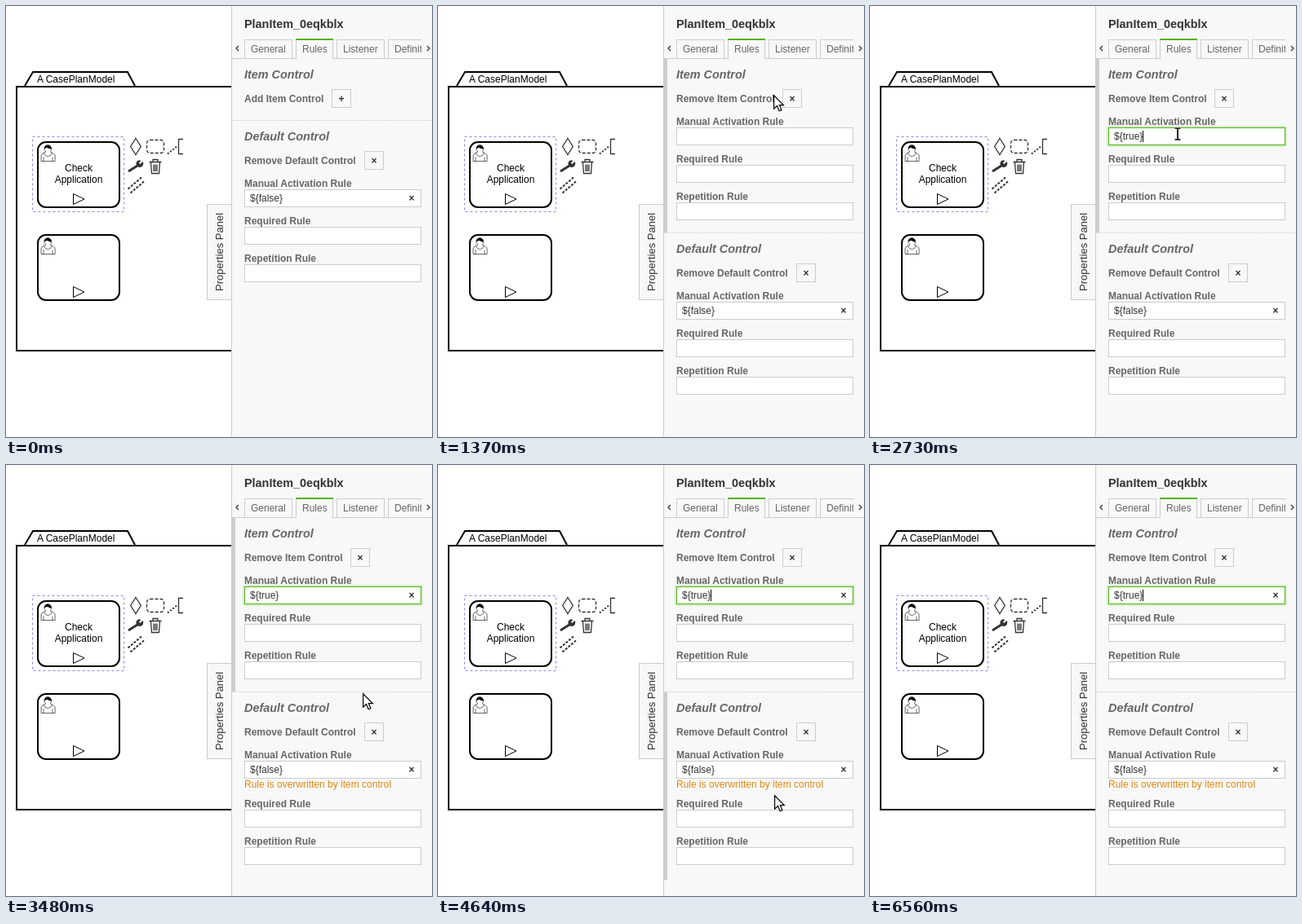
These frames come from a looping animation (522x529 px, 6.74 s). An HTML page:

```html
<!DOCTYPE html>
<html>
<head>
<meta charset="utf-8">
<style>
html, body { margin: 0; width: 100%; height: 100%; overflow: hidden; background: #fff; }
svg { display: block; }
text { font: 12px "Liberation Sans", Arial, sans-serif; fill: #000; white-space: pre; }
.tab { fill: #666; }
.label { font-weight: bold; fill: #666; }
.head { font: italic bold 14.4px "Liberation Sans", Arial, sans-serif; fill: #666; }
.title { font: bold 14.4px "Liberation Sans", Arial, sans-serif; fill: #333; }
.value { fill: #333; }
.sign { font-weight: bold; fill: #333; text-anchor: middle; }
.warn { fill: #e08a14; }
.box { fill: #f8f8f8; stroke: #ccc; }
.input { fill: #fff; stroke: #ccc; }
.line { fill: none; stroke: #000; }
.icon { fill: none; stroke: #333; stroke-width: 1.3; }
</style>
</head>
<body>
<svg id="stage" width="522" height="529" viewBox="0 0 522 529">
  <defs>
    <g id="task">
      <rect class="line" width="100" height="80" rx="10" stroke-width="2"/>
      <path class="line" d="M43.5 63.5v13l13.5-6.5z"/>
      <g stroke="#000" stroke-width=".6" fill="#fff">
        <path d="M15 12c.9-.8 1.6-2 1.6-3.4c0-2.6-1.8-4.6-4.4-4.6S8 6.100 8 8.600c0 1.400 1 2.600 1.900 3.400c-.5.2-5.700 2.100-5.800 4.800v6.700h17v-6.700c0-2.300-5.500-4.600-6.100-4.800zM7 18v5.500M18 23.500v-5"/>
        <path d="M17.200 13c0 2.400-2.200 4.400-4.900 4.400s-4.800-2-4.800-4.400"/>
        <path fill="#000" d="M8.100 8.200s2.300-2.400 4.300-1.200s4.200 1.500 4.100 1c-.1-.6-.1-3.800-4.200-4.200c-3.600 0-4.200 3.400-4.200 4.400z"/>
      </g>
    </g>
  </defs>

  <path class="line" stroke-width="2" d="M280 99H13V423H280M23 98L33 81H149L158 98"/>
  <text x="38" y="94">A CasePlanModel</text>
  <use href="#task" x="39" y="167"/>
  <use href="#task" x="39" y="281"/>
  <g text-anchor="middle">
    <text x="89" y="203">Check</text>
    <text x="89" y="217">Application</text>
  </g>
  <rect x="32.500" y="160.500" width="112" height="92" fill="none" stroke="#88f" stroke-dasharray="3 3"/>

  <g class="icon">
    <path d="M159 162.500L165.300 172.500L159 182.500L152.700 172.500z"/>
    <rect x="172.500" y="164.500" width="21" height="16" rx="4" stroke-dasharray="4 2"/>
    <path d="M217 163.500H211.500V181.500H217"/>
    <path d="M198 181.500L210 172" stroke-width="2" stroke-dasharray="2 2"/>
    <path d="M150 203L161 196" stroke-width="3"/>
    <path d="M167.500 191.500L164.500 194.500L162.500 192.500L164.500 190C160.500 189 158.500 193 161 196.500C164 199 169 197 167.500 191.500z" fill="#333" stroke-width="1"/>
    <path d="M175.500 191.500H190.500M180 191V188.500H186V191M177.500 192L178.500 205.500H187.500L188.500 192M181 194.500V203M183 194.500V203M185 194.500V203"/>
    <path d="M149.500 224.500L166 210.500M152.500 229.500L169 215.500" stroke-width="2" stroke-dasharray="3 1.700"/>
  </g>

  <rect x="277" width="245" height="529" fill="#f8f8f8"/>
  <rect class="box" x="246.500" y="243.500" width="30" height="117"/>
  <path d="M276.500 0V529" stroke="#ccc"/>
  <text class="value" transform="translate(266 350) rotate(-90)" style="font-size:13px">Properties Panel</text>

  <text class="title" x="292" y="27">PlanItem_0eqkblx</text>
  <path d="M277 64.500H522" stroke="#ccc"/>
  <rect class="box" x="292.500" y="41.500" width="58" height="23"/>
  <rect class="box" x="405.500" y="41.500" width="58" height="23"/>
  <rect x="355" y="40" width="46" height="25" fill="#f8f8f8"/>
  <path class="line" style="stroke:#ccc" d="M355.500 40V65M400.500 40V65"/>
  <rect x="355" y="40" width="46" height="2" fill="#52b415"/>
  <text class="tab" x="300" y="57">General</text>
  <text class="tab" x="363" y="57">Rules</text>
  <text class="tab" x="413" y="57">Listener</text>
  <svg x="468" y="41" width="41" height="24">
    <rect class="box" x=".5" y=".5" width="70" height="23"/>
    <text class="tab" x="8" y="16">Definition</text>
  </svg>
  <path class="icon" d="M285 49L282 52L285 55M516 49L519 52L516 55"/>

  <rect id="bar" x="277" width="4" fill="#ccc"/>
  <g id="panel"></g>
  <path id="caret" d="M0 153V167" stroke="#000"/>
  <g id="arrow">
    <path d="M.6 .8V17.200L4.500 13.600L7.100 19.800L9.900 18.600L7.300 12.600H12.300z" fill="#fff" stroke="#000" stroke-width="1.200"/>
  </g>
  <g id="beam" fill="none">
    <path d="M-3.500-7H-1Q0-7 0-6V6Q0 7-1 7H-3.500M3.500-7H1Q0-7 0-6V6Q0 7 1 7H3.500" stroke="#fff" stroke-width="3.500"/>
    <path d="M-3.500-7H-1Q0-7 0-6V6Q0 7-1 7H-3.500M3.500-7H1Q0-7 0-6V6Q0 7 1 7H3.500" stroke="#000" stroke-width="1.700"/>
  </g>
</svg>
<script>
const $ = id => document.getElementById(id);
const text = (cls, x, y, s) => `<text class="${cls}" x="${x}" y="${y}">${s}</text>`;
const button = (x, y, s) =>
  `<rect class="box" x="${x + .5}" y="${y + .5}" width="23" height="22"/>` + text('sign', x + 12, y + 16, s);

// y is the middle of the label
function field(name, y, value = '', clear = value, focus = false) {
  const box = (extra, grow) =>
    `<rect x="${292.5 - grow}" y="${y + 7.5 - grow}" width="${216 + 2 * grow}" height="${21 + 2 * grow}" ${extra}/>`;
  return text('label', 292, y + 4, name + ' Rule') +
    (focus ? box('rx="2" fill="none" stroke="#52b415" stroke-opacity=".2" stroke-width="3"', 1) : '') +
    box(`class="input" ${focus ? 'style="stroke:#52b415"' : ''}`, 0) +
    (value ? text('value', 299, y + 22, value) : '') +
    (clear ? text('sign', 497, y + 22, '×') : '');
}

function panel(open, focus, typed, checked) {
  const y = open ? 278 : 140;
  const gap = checked ? 14 : 0;
  let s = text('head', 292, 89, 'Item Control');
  s += text('label', 292, 118, (open ? 'Remove' : 'Add') + ' Item Control');
  s += open ? button(422, 102, '×') : button(399, 102, '+');
  if (open) {
    s += field('Manual Activation', 142, typed ? '${true}' : '', checked, focus) +
      field('Required', 188) + field('Repetition', 234);
  }
  s += `<path d="M277 ${y + .5}H522" stroke="#ccc" stroke-dasharray="1 1"/>`;
  s += text('head', 292, y + 25, 'Default Control');
  s += text('label', 292, y + 54, 'Remove Default Control') + button(439, y + 38, '×');
  s += field('Manual Activation', y + 78, '${false}');
  if (checked) s += text('warn', 292, y + 118, 'Rule is overwritten by item control');
  return s + field('Required', y + 124 + gap) + field('Repetition', y + 170 + gap);
}

const LOOP = 6740;
const blinks = [2090, 2580, 2730, 3210, 3700, 4170, 4640, 5120, 5600, 6110, 6560];
// time, x, y of the pointer
const path = [
  [720, 515, 171], [1080, 407, 112], [1200, 411, 109], [1370, 411, 109], [1970, 377, 157],
  [2980, 377, 157], [3480, 437, 280], [3680, 455, 340], [3880, 472, 400], [4000, 468, 411],
  [4320, 443, 405], [4640, 412, 405], [5040, 428, 405], [5100, 428, 405], [5360, 437, 403],
  [6070, 437, 403], [6400, 526, 385]
];

function pointer(t) {
  const i = path.findIndex(p => p[0] > t);
  if (i < 1) return null;
  const [a, b] = [path[i - 1], path[i]];
  const k = (t - a[0]) / (b[0] - a[0]);
  const e = k * k * (3 - 2 * k);
  return [1, 2].map(n => Math.round(a[n] + (b[n] - a[n]) * e));
}

function place(id, on, x, y) {
  $(id).style.display = on ? '' : 'none';
  if (on) $(id).setAttribute('transform', `translate(${x} ${y})`);
}

let last = '';
function draw(now) {
  const t = now % LOOP;
  const typed = t >= 2730;
  const state = [t >= 1370, t >= 2090, typed, t >= 3000];
  if (last !== state.join()) {
    last = state.join();
    $('panel').innerHTML = panel(...state);
  }

  const lower = t >= 3520;
  $('bar').style.display = t >= 1370 && t < 6400 ? '' : 'none';
  $('bar').setAttribute('y', lower ? 279 : 65);
  $('bar').setAttribute('height', lower ? 230 : 213);

  place('caret', blinks.filter(b => b <= t).length % 2, typed ? 334.5 : 299.5, 0);

  const p = pointer(t);
  const [x, y] = p || [0, 0];
  const inField = t >= 1370 && y > 148 && y < 172;
  place('arrow', p && !inField, x, y);
  place('beam', p && inField && !(t >= 2090 && t < 2430), x, y);
}

function tick(now) {
  draw(now);
  requestAnimationFrame(tick);
}
draw(0);
requestAnimationFrame(tick);
</script>
</body>
</html>
```
